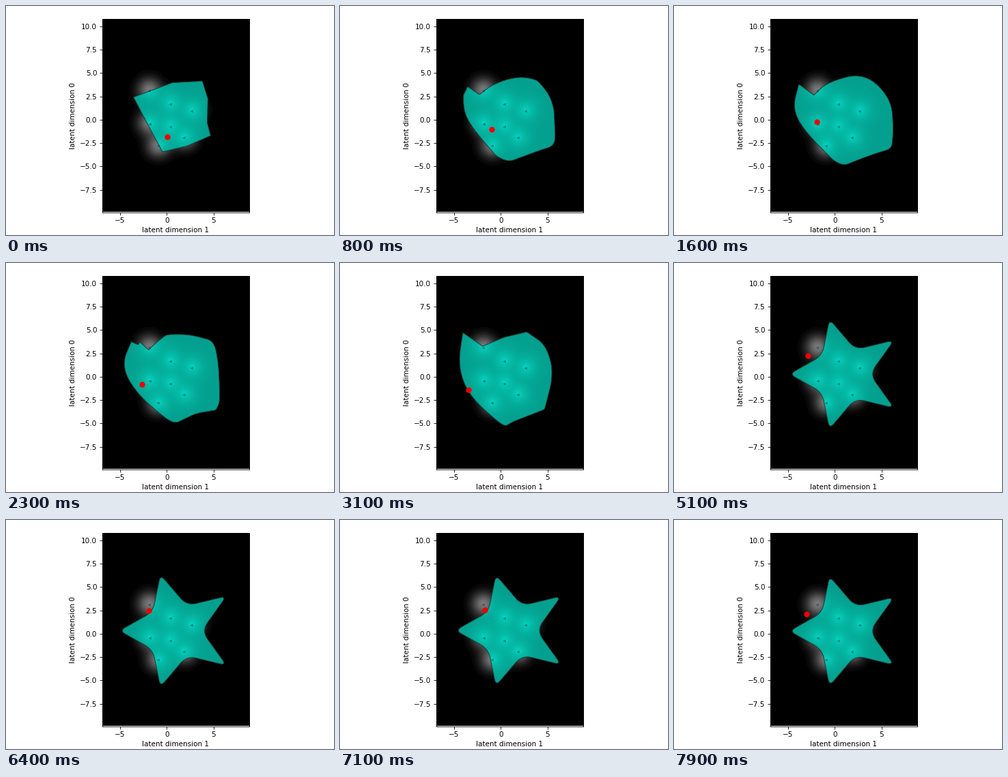
Animation, 480 px wide and 336 px high, one loop 8 s. Source, as a matplotlib script:

```python
import numpy as np
import matplotlib.pyplot as plt
from matplotlib.animation import FuncAnimation

DPI = 75
W, H = 480, 336
LEFT, RIGHT, TOP, BOTTOM = 140.5, 355.5, 19.5, 302.5
ORIGIN_X, ORIGIN_Y, UNIT = 235.4, 166.8, 13.7   # stage pixels per data unit
CENTER = np.array([240, 165])
FRAMES, STEP_MS = 80, 100
PAUSES = {13: 12, 28: 27, 32: 31, 33: 31, 38: 37, 68: 67}
ANGLES = np.linspace(-np.pi, np.pi, 720, endpoint=False)

TEAL = np.array([4, 160, 143]) / 255


def to_data(x, y):
    return (np.asarray(x) - ORIGIN_X) / UNIT, (ORIGIN_Y - np.asarray(y)) / UNIT


def radii(corners):
    """Distance from the centre to the outline at every angle.

    A corner is (x, y, softness): 0 is sharp, 1 rounds it from the middle
    of one side to the middle of the next.
    """
    c = np.array(corners, float)
    p, half = c[:, :2] - CENTER, c[:, 2:] / 2
    start = p + (np.roll(p, 1, 0) - p) * half
    end = p + (np.roll(p, -1, 0) - p) * half
    u = np.linspace(0, 1, 40)[:, None]
    dense = []
    for a, b, d, following in zip(start, p, end, np.roll(start, -1, 0)):
        dense.append((1 - u) ** 2 * a + 2 * u * (1 - u) * b + u ** 2 * d)
        dense.append(d + (following - d) * u)
    x, y = np.vstack(dense).T
    return np.interp(ANGLES, np.arctan2(y, x), np.hypot(x, y), period=2 * np.pi)


def star(cx, cy, size):
    """Five soft tips, the first to the left; notches deepen to the right."""
    corners = []
    for k in range(10):
        a = np.pi + k * np.pi / 5
        r = size * (0.47 - 0.085 * np.cos(a)) if k % 2 else size
        corners.append((cx + r * np.cos(a), cy + r * np.sin(a), 0.5 if k % 2 else 0.35))
    return radii(corners)


def mix(a, b, t):
    return a + (b - a) * t


# Corners in stage pixels, clockwise from the upper left
FACET = radii([(187, 134, 0), (243, 113, 0), (287, 110.5, 0), (295, 136, 0),
               (294, 171, 0), (299, 190, 0), (265, 205, 0), (229, 213.5, 0),
               (208, 174, 0)])
BOWL = radii([(183, 115, 0), (205, 131, 0), (225, 112, 1), (278, 98, 1),
              (317, 135, 1), (321, 180, 1), (318, 209, 0.5), (285, 219, 1),
              (243, 236, 0.6), (190, 182, 1), (174, 150, 1)])
SHIELD = radii([(180, 102.5, 0), (209, 122.5, 0), (240, 109.5, 0.2),
                (273, 101.5, 0.1), (300, 120, 0.8), (313, 160, 1),
                (299, 214.5, 0.1), (254, 232, 0.1), (240, 240, 0.6),
                (190, 196, 1), (173, 152, 1)])
BLOCK = radii([(189, 108, 0), (209, 128, 0), (235, 102.5, 0.3), (278, 110, 0.6),
               (307, 113, 0.8), (305, 155, 0.5), (309, 217, 0.15),
               (277, 219.5, 0.5), (246, 236.5, 0.4), (193, 199, 1), (165, 150, 1)])
STAR = star(253.6, 163, 84)

POSES = [(0, FACET), (9, mix(FACET, BOWL, 0.85)), (16, BOWL),
         (23, mix(BOWL, BLOCK, 0.6)), (31, SHIELD), (41, BLOCK),
         (47, mix(BLOCK, STAR, 0.85)), (51, STAR), (64, star(252.6, 162.5, 86)),
         (71, star(254.5, 162, 85)), (79, STAR)]
POSE_TIMES, POSE_RADII = zip(*POSES)

# Frame, x and y of the dot where its path bends
DOT_PATH = np.array([(0, 235.5, 192.5), (16, 209, 170.5), (31, 187.5, 186),
                     (41, 191, 165.2), (51, 195.5, 136.5), (64, 208.5, 133.5),
                     (71, 212, 132), (79, 193.5, 138)])


def outline(t):
    i = min(np.searchsorted(POSE_TIMES, t, "right"), len(POSES) - 1)
    t0, t1 = POSE_TIMES[i - 1], POSE_TIMES[i]
    r = mix(POSE_RADII[i - 1], POSE_RADII[i], (t - t0) / (t1 - t0)) + 0.4
    return np.column_stack(to_data(CENTER[0] + r * np.cos(ANGLES),
                                   CENTER[1] + r * np.sin(ANGLES)))


# Certainty of a Gaussian process around the training points
samples = np.array([(-1.9, 3.1), (0.33, 1.68), (2.6, 0.95), (-1.87, -0.42),
                    (0.33, -0.72), (1.78, -1.9), (-0.95, -2.8)])
x0, y0 = to_data(LEFT, BOTTOM)
x1, y1 = to_data(RIGHT, TOP)
extent = (x0, x1, y0, y1)
gx, gy = np.meshgrid(np.linspace(x0, x1, 430), np.linspace(y0, y1, 566))
dist = np.hypot(gx[..., None] - samples[:, 0], gy[..., None] - samples[:, 1])
SCALE = 1.3


def kernel(d):
    return np.exp(-d ** 2 / (2 * SCALE ** 2))


gap = np.linalg.norm(samples[:, None] - samples, axis=2)
inverse = np.linalg.inv(kernel(gap) + 0.02 * np.eye(len(samples)))
near = kernel(dist)
sure = np.clip(((near @ inverse) * near).sum(axis=2), 0, 1)

gray = 0.5 * np.floor(sure * 16) / 16
spot = np.exp(-dist / 0.5).max(axis=2)
tint = (TEAL + sure[..., None] * np.array([0, 22, 20]) / 255
        + spot[..., None] * np.array([2, 34, 30]) / 255)

fig = plt.figure(figsize=(W / DPI, H / DPI), dpi=DPI, facecolor="white")
ax = fig.add_axes([LEFT / W, 1 - BOTTOM / H, (RIGHT - LEFT) / W, (BOTTOM - TOP) / H])
look = dict(origin="lower", extent=extent, aspect="auto")
ax.imshow(gray, cmap="gray", vmin=0, vmax=1, zorder=0, **look)
body, = ax.fill([0, 1, 1], [0, 0, 1], facecolor=TEAL, edgecolor="none", zorder=2)
glow = ax.imshow(np.clip(tint, 0, 1), zorder=3, **look)
rim, = ax.plot([], [], color="#1c3a37", lw=0.9, zorder=4)
ax.plot(*samples.T, "<", ms=4.4, color="#14386a", alpha=0.5, mew=0, zorder=5)
dot, = ax.plot([], [], "o", ms=8, color="#f00000", mew=0, zorder=6)

ax.set_xlim(x0, x1)
ax.set_ylim(y0, y1)
ax.set_xticks([-5, 0, 5])
ax.set_yticks(np.arange(-7.5, 10.1, 2.5))
ax.set_xlabel("latent dimension 1", labelpad=4.4)
ax.set_ylabel("latent dimension 0", labelpad=4.8)


def draw(frame):
    t = PAUSES.get(frame, frame)
    xy = outline(t)
    body.set_xy(xy)
    glow.set_clip_path(body)
    rim.set_data(*np.vstack([xy, xy[:1]]).T)
    times, path_x, path_y = DOT_PATH.T
    x, y = to_data(np.interp(t, times, path_x), np.interp(t, times, path_y))
    dot.set_data([x], [y])
    return body, glow, rim, dot


anim = FuncAnimation(fig, draw, frames=FRAMES, interval=STEP_MS, repeat=True,
                     repeat_delay=0, blit=False)
plt.show()
```
